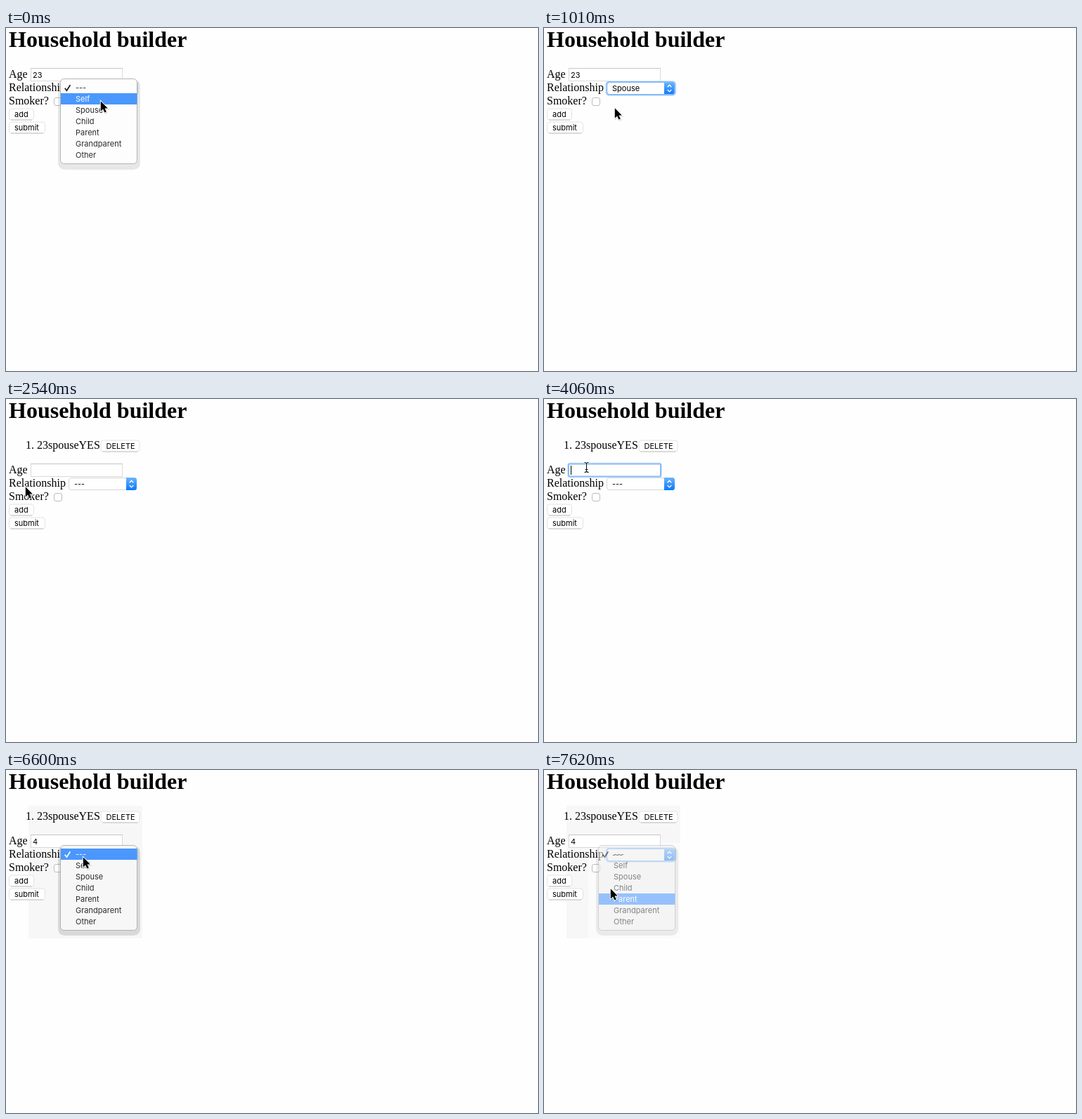
Recreate the animation shown at these times as an HTML page. Size 757 by 489 pixels, loop 8000 ms.

```html
<!DOCTYPE html>
<html lang="en">
<head>
<meta charset="utf-8">
<title>Household builder</title>
<style>
  html, body { margin: 0; width: 100%; height: 100%; overflow: hidden; background: #fefefe; }
  svg { display: block; width: 100vw; height: 100vh; }
  text { font: 16px "Liberation Serif", Times, serif; fill: #000; white-space: pre; }
  .h { font-size: 32px; font-weight: bold; }
  .ui { font: 11px Inter, "Open Sans", sans-serif; }
</style>
</head>
<body>
<svg id="stage" viewBox="0 0 757 489">
  <defs>
    <linearGradient id="blue" x1="0" y1="0" x2="0" y2="1">
      <stop offset="0" stop-color="#6cb4fb"/><stop offset="1" stop-color="#0a77fd"/>
    </linearGradient>
  </defs>
  <text class="h" x="4" y="27">Household builder</text>
  <g id="view"></g>
</svg>
<script>
const LOOP = 8000;
const OPTIONS = ['---', 'Self', 'Spouse', 'Child', 'Parent', 'Grandparent', 'Other'];

// Each step holds the properties that change from the step before.
const STEPS = [
  { t: 0, age: '23', pick: '---', focus: 'select', menu: 1, hover: 1, arrow: [134, 103] },
  { t: 500, hover: 2, arrow: [121, 119] },
  { t: 1010, menu: 0, pick: 'Spouse', arrow: [100, 113] },
  { t: 1520, focus: '', checked: true, arrow: [77, 101] },
  { t: 2030, arrow: [31, 123] },
  { t: 2540, added: true, age: '', pick: '---', checked: false, arrow: [27, 124] },
  { t: 3560, arrow: null, beam: [60, 89] },
  { t: 4060, focus: 'age', caret: 38, beam: [60, 90] },
  { t: 4570, caret: 0, beam: null, arrow: [108, 110] },
  { t: 5080, caret: 38 },
  { t: 5590, age: '4', caret: 45, arrow: null, beam: [113, 52] },
  { t: 6100, caret: 0 },
  { t: 6600, focus: 'select', menu: 1, hover: 0, shade: 1, beam: null, arrow: [109, 123] },
  { t: 7110, hover: 3, arrow: [100, 169] },
  { t: 7620, hover: 4, menu: 0.57, shade: 2, arrow: [94, 168] }
];
const states = [];
STEPS.forEach((s, i) => states.push({ ...states[i - 1], ...s }));

const rect = (x, y, w, h, fill, more = '') =>
  `<rect x="${x}" y="${y}" width="${w}" height="${h}" fill="${fill}" ${more}/>`;
const line = (d, color, width = 1, more = '') =>
  `<path d="${d}" fill="none" stroke="${color}" stroke-width="${width}" ${more}/>`;
const text = (x, y, str, cls = '', more = '') =>
  `<text x="${x}" y="${y}" class="${cls}" ${more}>${str}</text>`;
const group = (body, more) => `<g ${more}>${body}</g>`;

function button(x, y, w, label) {
  return rect(x + .5, y + .5, w - 1, 16, '#fff', 'rx="3.5" stroke="#e2e2e2"') +
    line(`M${x + 3} ${y + 16.5}h${w - 6}`, '#c4c4c4') +
    text(x + 8, y + 12.5, label, 'ui');
}

function ring(x, y, w, h, r) {
  return rect(x - 1.5, y - 1.5, w + 3, h + 3, 'none', `rx="${r + 1}" stroke="#d3e6fc"`) +
    rect(x, y, w, h, 'none', `rx="${r}" stroke="#86bbf7" stroke-width="2"`);
}

function ageField(s) {
  let out = rect(35.5, 57.5, 130, 18, '#fff', 'stroke="#d9d9d9"') +
    line('M35 57.5h131', '#c6c6c6');
  if (s.focus === 'age') out += ring(35, 57.5, 131, 18, 1.5);
  return out + text(38, 71, s.age, 'ui');
}

function select(s) {
  let out = rect(89.5, 77.5, 96, 17, '#fff', 'rx="3.5" stroke="#d6d6d6"') +
    '<path d="M171 77h11.500q3.500 0 3.500 3.500v11q0 3.500-3.500 3.500H171z" fill="url(#blue)"/>' +
    line('M175.700 84.200l2.800-2.900 2.800 2.900M175.700 88l2.800 2.900 2.800-2.900', '#fff', 1.3);
  if (s.focus === 'select') out += ring(89.3, 77, 97, 18, 3.5);
  return out + text(97, 90, s.pick, 'ui');
}

function checkbox(on) {
  return on
    ? rect(68, 99, 12, 12, 'url(#blue)', 'rx="2.500"') +
      line('M71 105.300l2.300 2.700 4-6.300', '#fff', 1.6)
    : rect(68.5, 99.5, 11, 11, '#fff', 'rx="2.500" stroke="#bdbdbd"');
}

function menu(s) {
  const tone = s.shade === 2 ? '#efefef' : s.shade ? '#f7f7f7' : '#fdfdfd';
  const halo = s.shade ? .12 : .09;
  const end = s.shade ? 201 : 202;
  let out = `<path d="M74 84q0-9 6-9h105q6 0 6 9v${end - 95}q0 11-11 11H85q-11 0-11-11z" fill="#000" fill-opacity="${halo}"/>` +
    rect(77.5, 72.5, 109, 121, tone, 'rx="5" stroke="#b4b4b4"') +
    rect(78, 77 + 16 * s.hover, 108.5, 16, '#4a97fe');
  OPTIONS.forEach((name, i) => {
    const fill = i === s.hover ? '#fff' : '#2b2b2b';
    out += text(99, 89 + 16 * i, name, 'ui', `style="fill:${fill}"`);
  });
  out += line('M83.800 85.800l2.600 3.400 5-8', s.hover ? '#1c1c1c' : '#fff', 1.7);
  return group(out, `opacity="${s.menu}"`);
}

function form(s) {
  return text(4, 71, 'Age') + ageField(s) +
    text(4, 90, 'Relationship') + select(s) +
    text(4, 109, 'Smoker?') + checkbox(s.checked) +
    button(4, 114.5, 36, 'add') + button(4, 133.5, 52, 'submit') +
    (s.caret ? rect(s.caret, 60, 1, 13, '#000') : '') +
    (s.menu ? menu(s) : '');
}

function shade(level) {
  if (!level) return '';
  return rect(32, 51, 162, 189, '#f7f7f7') +
    (level === 2 ? rect(63, 104, 131, 136, '#fbfbfb') : '');
}

function arrow([x, y]) {
  const d = 'M.8 1.200V15.500L4.100 12.400 6.400 17.600 8.800 16.600 6.500 11.500H10.800z';
  return group(
    `<path d="${d}" transform="translate(.8 1.200)" fill="#000" stroke="#000" stroke-width="2" opacity=".13"/>` +
    `<path d="${d}" fill="#000" stroke="#fff" stroke-width="1.800" paint-order="stroke"/>`,
    `transform="translate(${x} ${y})"`);
}

function beam([x, y]) {
  const d = 'M-2.500.5Q.5.5.5 2.500Q.5.5 3.500.5M.5 2V13M-2.500 14.500Q.5 14.500.5 12.500Q.5 14.500 3.500 14.500M-1.500 10.500h4';
  return group(line(d, '#fff', 2.4, 'opacity=".7"') + line(d, '#111', 1.1),
    `transform="translate(${x} ${y})"`);
}

function draw(s) {
  const item = s.added
    ? text(28, 71, '1.') + text(44, 71, '23spouseYES') + button(134.5, 58.5, 56, 'DELETE')
    : '';
  return shade(s.shade) + item +
    group(form(s), `transform="translate(0 ${s.added ? 35 : 0})"`) +
    (s.arrow ? arrow(s.arrow) : '') + (s.beam ? beam(s.beam) : '');
}

const view = document.getElementById('view');
const start = performance.now();
let shown = null;

function tick() {
  const t = (performance.now() - start) % LOOP;
  const s = states.filter(o => o.t <= t).pop() || states[0];
  if (s !== shown) view.innerHTML = draw(shown = s);
  requestAnimationFrame(tick);
}
tick();
</script>
</body>
</html>
```
